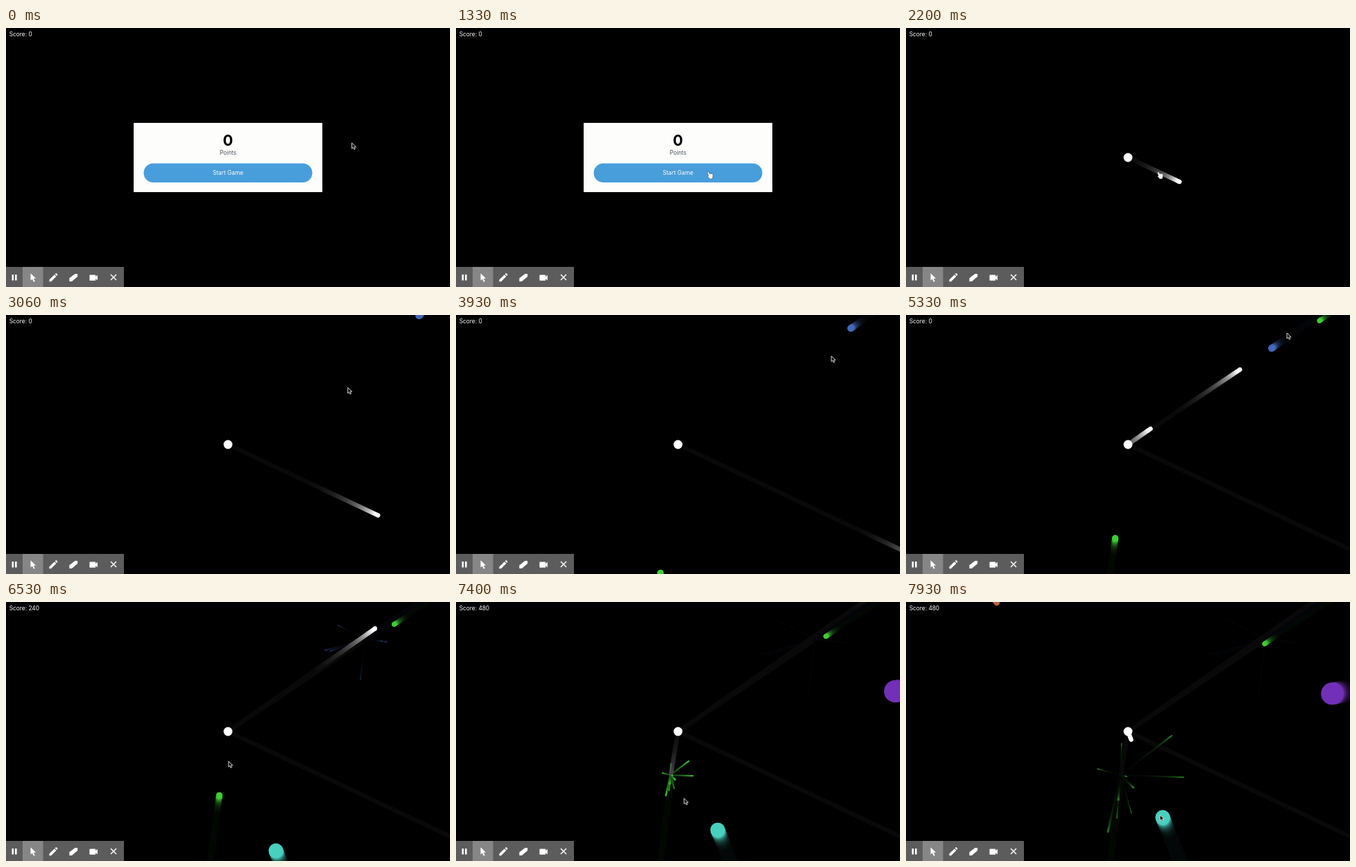
Recreate the animation shown at these times as an HTML page with a canvas. Size 640 by 374 pixels, loop 8 s.

```html
<!DOCTYPE html>
<html lang="en">
<head>
<meta charset="utf-8">
<title>Shooter</title>
<style>
html, body { margin: 0; width: 640px; height: 374px; overflow: hidden; background: #000; }
canvas, svg { position: absolute; left: 0; top: 0; display: block; }
text { font-family: Inter, Roboto, sans-serif; font-size: 8.3px; }
</style>
</head>
<body>
<canvas id="stage" width="640" height="374"></canvas>
<svg width="640" height="374" viewBox="0 0 640 374">
  <text id="score" x="4.8" y="12" fill="#fff">Score: 0</text>
  <g id="modal" text-anchor="middle">
    <rect x="184" y="137" width="272" height="100" fill="#fdfdfc"/>
    <text x="320" y="170" style="font-size:22px;font-weight:700">0</text>
    <text x="320" y="183" fill="#4a5260">Points</text>
    <rect x="198.5" y="195.5" width="243" height="27.5" rx="13.75" fill="#489ddb"/>
    <text x="320" y="212.4" fill="#fff">Start Game</text>
  </g>
  <g id="toolbar" fill="#fff">
    <rect y="345" width="170" height="29" fill="#5c5c5c"/>
    <rect x="24" y="345" width="29.5" height="29" fill="#868686"/>
    <path d="M8.5 356h2.6v8.5h-2.6zM13 356h2.6v8.5h-2.6z"/>
    <path d="M35.5 354.2v10.4l2.4-2.1 2 4.2 1.8-.9-2-4.1h3.4z"/>
    <path d="M62.4 366.2v-2.6l7.4-7.4 2.6 2.6-7.4 7.4zM70.6 355.4l1.2-1.1q.5-.4 1 0l1.4 1.5q.4.5 0 1l-1.1 1.1z"/>
    <path d="M91.3 361.3l8.2-6.4h3.6v4l-8.2 7.2h-3.6z"/>
    <path d="M121.2 356.4h7.2q.8 0 .8.8v2l2.7-2.6v8l-2.7-2.6v2q0 .8-.8.8h-7.2q-.8 0-.8-.8v-6.8q0-.8.8-.8z"/>
    <path d="M151 356l8 8m0-8l-8 8" stroke="#fff" stroke-width="1.5"/>
  </g>
  <path id="arrow" d="M0 0v8.1l1.9-1.7 1.4 3 1.5-.7-1.3-2.9h2.6z" fill="#111" stroke="#e4e4e4" stroke-width=".9"/>
  <path id="hand" d="M1.2 .6q1.1-.6 1.6.5l.8 2 1.1-.4 1 .2.9-.2 1 .5q.9.1.9 1.2l-.3 3.4-.9 2.6h-3.6l-2.7-3.2q-1-1.3.8-1.3l-1.3-3.9q-.2-1 .7-1.4z" fill="#f4f4f4" stroke="#333" stroke-width=".5"/>
</svg>
<script>
const LOOP = 8000, TAU = 175, STEP = 16, RESIDUE = 0.035;
const START = 1530, SPEED = 0.1825, CX = 320, CY = 187;
const HIT_1 = 5541, HIT_2 = 7165;
const WHITE = [255, 255, 255], GREEN = [62, 205, 52], BLUE = [66, 104, 190];
const $ = id => document.getElementById(id);
const ctx = $('stage').getContext('2d');

// Enemies: time and place of reference, velocity, life span
const enemies = [
  { t: 3930, x: 569, y: 19.3, vx: -.03, vy: .0206, r: 4.8, rgb: BLUE, from: 2950, to: HIT_1 },
  { t: 3930, x: 294.8, y: 372.3, vx: .0049, vy: -.0358, r: 4.5, rgb: GREEN, from: 3750, to: HIT_2 },
  { t: 5330, x: 596, y: 8.3, vx: -.0304, vy: .02, r: 3.4, rgb: GREEN, from: 4755, to: LOOP },
  { t: 6530, x: 389, y: 359, vx: -.0136, vy: -.0343, r: 10.4, rgb: [72, 207, 190], from: 5800, to: LOOP },
  { t: 7400, x: 633, y: 129, vx: -.0355, vy: .0064, r: 15.8, rgb: [114, 48, 184], from: 6760, to: LOOP },
  { t: 7930, x: 131, y: 1.5, vx: .0256, vy: .0252, r: 3.6, rgb: [190, 98, 58], from: 7690, to: LOOP }
];

// Shots: launch, end, direction
const shots = [
  { from: START, to: 4200, dx: 74, dy: 35, slow: true },
  { from: 4267, to: HIT_1, dx: 161, dy: -108 },
  { from: 5113, to: 6950, dx: 211, dy: -148 },
  { from: HIT_2 - 343, to: HIT_2, dx: -10.3, dy: 63 },
  { from: 7862, to: LOOP, dx: 46, dy: 120 }
];

// Sparks: offset after 46 ticks, radius
const bursts = [
  { t: HIT_1, x: 518, y: 54, rgb: BLUE, parts: [
    [25, 3, .9], [20, 2, .9], [-48, 13, .9], [-42, 14, .9], [-33, -17, .6], [-6, 48, .5], [-20, 6, .7]] },
  { t: HIT_2, x: 309, y: 250, rgb: GREEN, parts: [
    [74, -57, 1.1], [91, 3, 1], [-18, 82, 1.3], [19, 18, 1.3], [-33, -9, .8], [-3, 36, 1.4],
    [-5, 62, .8], [16, 55, .6], [2, -46, .6], [9, 2, 1]] }
];

// Pointer tip: time, x, y
const pointer = [
  [0, 498.5, 166], [60, 498.5, 166], [660, 362, 207.5], [2400, 362, 207.5], [3260, 532, 74],
  [3930, 541, 59.3], [4267, 543, 38], [5000, 549, 26], [5500, 549, 26], [6300, 326, 222],
  [6530, 320.8, 230], [6817, 310, 256], [7400, 328.7, 283.5], [7930, 366, 307.5], [LOOP, 367, 309]
];

const shade = (rgb, k) => `rgb(${rgb.map(c => Math.round(c * k)).join()})`;

function segment(a, b, r, colour) {
  ctx.strokeStyle = colour;
  ctx.lineWidth = 2 * r;
  ctx.beginPath();
  ctx.moveTo(a[0], a[1]);
  ctx.lineTo(b[0], b[1] + .001);
  ctx.stroke();
}

// A moving dot whose past places fade out
function streak(t, pos, from, to, r, rgb, alpha = () => 1) {
  if (t < from) return;
  const head = Math.min(t, to);
  segment(pos(from), pos(head), r, shade(rgb, RESIDUE));
  for (let s = Math.max(from, head - 63 * STEP); s <= head; s += STEP) {
    const e = Math.min(s + STEP, head);
    const k = Math.exp((e - t) / TAU) * alpha(e);
    if (k > RESIDUE) segment(pos(s), pos(e), r, shade(rgb, k));
  }
}

function shotLength(s, t) {
  if (!s.slow) return SPEED * (t - s.from);
  return t < 2200 ? 82 * (t - s.from) / (2200 - s.from) : 82 + SPEED * (t - 2200);
}

function drawGame(t) {
  ctx.globalCompositeOperation = 'source-over';
  ctx.fillStyle = '#000';
  ctx.fillRect(0, 0, 640, 374);
  if (t < START) return;
  ctx.globalCompositeOperation = 'lighten';
  ctx.lineCap = 'round';

  for (const s of shots) {
    const n = Math.hypot(s.dx, s.dy);
    const pos = u => {
      const d = shotLength(s, u) / n;
      return [CX + s.dx * d, CY + s.dy * d];
    };
    streak(t, pos, s.from, s.to, 3.1, WHITE);
  }
  for (const e of enemies) {
    const pos = u => [e.x + e.vx * (u - e.t), e.y + e.vy * (u - e.t)];
    streak(t, pos, e.from, e.to, e.r, e.rgb);
  }
  for (const b of bursts) {
    const reach = u => (1 - .99 ** ((u - b.t) / 16.67)) / .37;
    const alpha = u => Math.max(0, 1 - (u - b.t) / 1667);
    for (const [dx, dy, r] of b.parts) {
      streak(t, u => [b.x + dx * reach(u), b.y + dy * reach(u)], b.t, b.t + 1667, r, b.rgb, alpha);
    }
  }
  ctx.fillStyle = '#fff';
  ctx.beginPath();
  ctx.arc(CX, CY, 6.4, 0, 7);
  ctx.fill();
}

function tip(t) {
  const i = Math.max(1, pointer.findIndex(p => p[0] > t));
  const [a, b] = [pointer[i - 1], pointer[i]];
  const k = (t - a[0]) / (b[0] - a[0]);
  return [a[1] + (b[1] - a[1]) * k, a[2] + (b[2] - a[2]) * k];
}

const show = (id, on) => $(id).style.display = on ? '' : 'none';

function frame(now) {
  const t = now % LOOP;
  drawGame(t);
  show('modal', t < START);
  const label = 'Score: ' + (t < HIT_1 ? 0 : t < HIT_2 ? 240 : 480);
  if ($('score').textContent !== label) $('score').textContent = label;
  const [x, y] = tip(t);
  const overButton = t < 2400 && x < 441 && y > 195;
  show('hand', overButton);
  show('arrow', !overButton);
  $(overButton ? 'hand' : 'arrow').setAttribute('transform', `translate(${x} ${y})`);
}

const began = performance.now();
function tick() {
  frame(performance.now() - began);
  requestAnimationFrame(tick);
}
tick();
</script>
</body>
</html>
```
